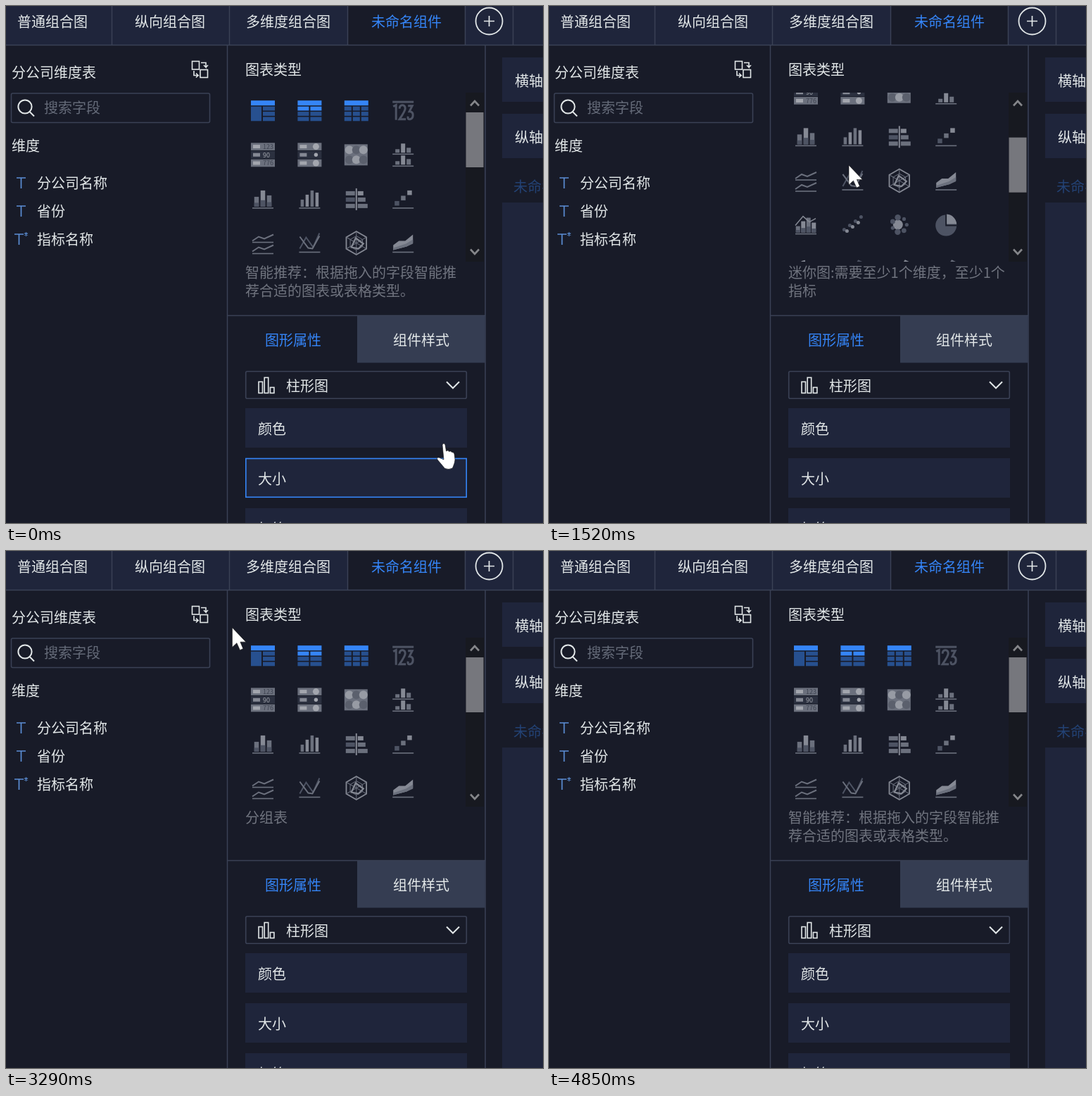
Write an HTML page that moves like this. It is 763 by 734 pixels and loops after 5.35 s.

```html
<!DOCTYPE html>
<html lang="zh-CN">
<head>
<meta charset="utf-8">
<style>
html, body { margin: 0; width: 100%; height: 100%; overflow: hidden; background: #181b28; }
svg { display: block; }
text { font: 300 20px "Noto Sans CJK SC", "Noto Sans CJK", sans-serif; white-space: pre; }
</style>
</head>
<body>
<svg id="stage" width="763" height="734" viewBox="0 0 763 734"></svg>
<script>
const BLUE = '#3585f7', NAVY = '#27508f', PANEL = '#1f253b', LINE = '#3a4155', BG = '#181b28';
const WHITE = '#e2e7e8', DARK = '#4d5363', GREY = '#6b707d', LIGHT = '#858994', PALE = '#a3a6ae';

const rect = (x, y, w, h, fill = GREY, extra = '') =>
  `<rect x="${x}" y="${y}" width="${w}" height="${h}" fill="${fill}" ${extra}/>`;
const stroke = (d, color = GREY, width = 2) =>
  `<path d="${d}" fill="none" stroke="${color}" stroke-width="${width}"/>`;
const frame = (x, y, w, h, color = LINE, extra = '') =>
  rect(x, y, w, h, 'none', `stroke="${color}" stroke-width="1.6" ${extra}`);
const shape = (d, fill = GREY) => `<path d="${d}" fill="${fill}"/>`;
const dot = (x, y, r, fill = GREY) => `<circle cx="${x}" cy="${y}" r="${r}" fill="${fill}"/>`;
const ring = (x, y, r, width) =>
  `<circle cx="${x}" cy="${y}" r="${r}" fill="none" stroke="${WHITE}" stroke-width="${width}"/>`;
const label = (x, middle, string, fill = WHITE) =>
  `<text x="${x}" y="${middle + 7.6}" fill="${fill}">${string}</text>`;
const repeat = (count, draw) => Array.from({ length: count }, (_, i) => draw(i)).join('');

// Chart icons, each drawn around its own centre
const base = (y = 13) => rect(-15, y - 0.8, 30, 1.6);
const tableHead = rect(-17, -14.5, 34, 7, BLUE);
const tableRow = (row, columns, color) => {
  const pitch = 36 / columns;
  return repeat(columns, i => rect(-17 + i * pitch, -6 + row * 7.4, pitch - 2, 5.8, color));
};
const cards = mark => repeat(3, i => {
  const y = -17 + i * 11.7, middle = i === 1;
  return rect(-17, y, 34, 10.6, middle ? '#2b303f' : GREY) +
    rect(-14, y + 2.8, 10, 5, middle ? LIGHT : PALE) + mark(y + 5.3, i);
});
const tinyNumber = (y, i) => `<text y="${y + 3.3}" style="font-size:9px" fill="${
  i === 1 ? PALE : '#3e4351'}">${['123', '90', '776'][i]}</text>`;

const columns = (heights, bottom, width, pitch) => heights.map((h, i) =>
  rect((i - (heights.length - 1) / 2) * pitch - width / 2, bottom - h, width, h, i % 2 ? LIGHT : GREY)).join('');
const stacked = (heights, bottom, width, pitch) =>
  columns(heights, bottom, width, pitch) + columns(heights.map(h => h / 2.5), bottom, width, pitch)
    .replaceAll(LIGHT, DARK).replaceAll(GREY, DARK);
const polygon = (sides, r) => 'M' + Array.from({ length: sides }, (_, i) => {
  const a = i * 2 * Math.PI / sides;
  return `${(r * Math.sin(a)).toFixed(1)} ${(-r * Math.cos(a)).toFixed(1)}`;
}).join('L') + 'Z';
const wave = y => stroke(`M-15 ${y}l9-6l8 3l13-6`);
const quarter = (turn, r, color) =>
  `<g transform="rotate(${turn})">${shape(`M1-1H${r}A${r} ${r} 0 0 0 1-${r}Z`, color)}</g>`;
const land = color => shape('M-16-2L-8-9L2-4L8-13L16-9L9 0L10 9L1 13L-6 8L-12 4Z', color);

const icons = [
  tableHead + rect(-17, -6, 15, 20.6, NAVY) + repeat(3, i => rect(0, -6 + i * 7.4, 17, 5.8, NAVY)),
  tableHead + tableRow(0, 2, BLUE) + tableRow(1, 2, NAVY) + tableRow(2, 2, NAVY),
  tableHead + repeat(3, i => tableRow(i, 3, NAVY)),
  rect(-15, -14, 30, 3, DARK) + stroke('M-14-6L-10-8V13M-5-3Q-5-8-1-8T3-3Q3 0-5 12H4M7-7H13L9 1Q14 1 14 6T10 12T7 8', DARK, 3),
  cards(tinyNumber),
  cards((y, i) => dot(9, y, i === 1 ? 2.7 : 4.5, PALE)),
  rect(-17, -15, 33, 30) + repeat(6, i => dot(-10 + i % 3 * 10, i < 3 ? -7 : 7, 6, i % 2 ? '#5b606d' : '#979ba4')),
  columns([5, 13, 7], -3, 6, 8) + base(-1) + columns([5, 13, 8], 14, 6, 8) + base(16),
  stacked([14, 23, 16], 11, 6.5, 9) + base(),
  columns([10, 17, 23, 20], 11, 4.5, 7) + base(),
  rect(-1, -15, 2, 31, LIGHT) + repeat(3, i =>
    rect(-15, -11 + i * 9, 13, 6, i === 1 ? DARK : GREY) + rect(2, -11 + i * 9, 8 + i * 3, 6, i ? GREY : LIGHT)),
  repeat(3, i => rect(-12 + i * 9, 3 - i * 7.5, 6.5, 6.5, [DARK, GREY, LIGHT][i])) + base(),
  wave(-3) + wave(12) + base(-1) + base(15),
  stroke('M-14 8L-5-8L5 6L14-14', DARK) + stroke('M-14-9L-2 7L4 8L14-10') + base(),
  stroke(polygon(6, 16.5), LIGHT, 1.8) + stroke(polygon(6, 10), GREY, 1) +
    repeat(3, i => `<path d="M0-16V16" stroke="${GREY}" transform="rotate(${i * 60})"/>`) +
    stroke('M-1-7L10 1L3 8L-7 6Z', LIGHT, 2.2),
  shape('M-14 3L-6-3L3-3L14-12V0L5 5L-14 10Z', LIGHT) + shape('M-14 7L4 1L14-5V1L5 5L-14 10Z') + base(),
  stacked([9, 16, 21, 14], 11, 6, 7.5) + stroke('M-15 1L-4-12L5-4L14-9', LIGHT, 1.5) + base(),
  repeat(7, i => dot(-12 + i * 4, 9 - i * 3 + i % 2 * 5 - 2, 2.5, i % 2 ? LIGHT : DARK)),
  dot(-2, 0, 7, LIGHT) + repeat(7, i => dot(10.5 * Math.cos(i * 0.9), 10.5 * Math.sin(i * 0.9), 2.6 + i % 3 * 0.8, DARK)),
  dot(0, 1, 15, DARK) + stroke('M0-14V1H15', BG, 2) + quarter(0, 15, LIGHT),
  repeat(4, i => quarter(i * 90, 10 + i % 2 * 2.5, i % 2 ? LIGHT : GREY)),
  land(DARK),
  land(LIGHT) + stroke('M-8-8L-4 2L9 4M-10 3L0 5L4 12', GREY, 1.2),
  land(GREY) + stroke('M8 9L-12-1L12-8L-3 7', LIGHT, 1.5)
];
const iconGrid = icons.map((icon, i) =>
  `<g transform="translate(${365 + i % 4 * 66.4} ${148.7 + Math.floor(i / 4) * 62.6})">${icon}</g>`).join('');

const fields = ['分公司名称', '省份', '指标名称'].map((name, i) =>
  stroke(`M${i < 2 ? 15 : 12} ${244 + i * 40}h13m-6.5 0v15`, '#5c8fd6', 1.7) + label(44, 251 + i * 40, name)).join('');
const rowTop = i => 571 + i * 71;
const rows = ['颜色', '大小', '标签'].map((name, i) =>
  rect(340, rowTop(i), 315, 56, PANEL) + label(358, rowTop(i) + 29, name)).join('');
const axes = ['横轴', '纵轴'].map((name, i) =>
  rect(705, 73 + i * 80, 58, 63, PANEL) + label(723, 106 + i * 80, name)).join('');

document.getElementById('stage').innerHTML =
  '<clipPath id="list"><path d="M315 123H653V363H315Z"/></clipPath>' +
  rect(0, 0, 763, 734, BG) + rect(0, 0, 763, 55, PANEL) + rect(485, 0, 167, 55, BG) +
  stroke('M0 55.5H763M150.5 0V55M317.5 0V55M485.5 0V55M652.5 0V55M720.5 0V55M314.5 55V734M681 55V734M315 439.5H681', LINE, 1.5) +
  label(16, 22, '普通组合图') + label(183, 22, '纵向组合图') + label(341, 22, '多维度组合图') +
  label(519, 22, '未命名组件', BLUE) +
  ring(686.5, 21.5, 19, 1.8) + stroke('M679 21.5h15M686.5 14v15', WHITE, 1.7) +

  label(8, 94, '分公司维度表') +
  frame(264.5, 78.5, 10, 11.5, WHITE) + frame(276, 90.5, 10.5, 11, WHITE) +
  stroke('M277 80.5H284V87l-3-3m3 3l3-3M267 92V98.5H273l-3-3m3 3l-3 3', WHITE, 1.6) +
  frame(7.5, 124, 282, 41.5, LINE, 'rx="2"') + ring(27, 143, 9.6, 2) + stroke('M33.5 150L40 156.5', WHITE) +
  label(54, 144, '搜索字段', '#656b79') + label(8, 198, '维度') + fields +
  stroke('M28.5 321v6m-2.5-4.5l5 3m0-3l-5 3', '#5c8fd6', 1.1) +

  label(340, 90, '图表类型') +
  `<g clip-path="url(#list)"><g id="icons">${iconGrid}</g></g>` +
  rect(653, 123, 26, 240, '#171920') + rect(653.5, 151, 25, 78, '#76777d', 'id="thumb"') +
  stroke('M660 141.5l6-6.5l6 6.5M660 345.5l6 6.5l6-6.5', '#85868a', 2.6) +
  '<g id="hint">' + label(340, 378, '', '#70747f') + label(340, 404, '', '#70747f') + '</g>' +
  rect(499, 440, 181.5, 66.5, '#353d52') + label(368, 474, '图形属性', BLUE) + label(550, 474, '组件样式') +
  frame(340.7, 518.7, 313.6, 38.6, LINE, 'rx="2"') +
  [16, 22, 8].map((h, i) => frame(359 + i * 8.2, 549.5 - h, 5.5, h, WHITE)).join('') +
  label(398, 539, '柱形图') + stroke('M626 533.5l9 9l9-9', WHITE) +
  rows + frame(340.8, 0, 313.4, 54.8, BLUE, 'id="focus"') +

  axes + label(721, 256, '未命名组件', '#234274') + rect(705, 279, 58, 455, PANEL) +
  '<g id="cursor" fill="#fff" stroke="#111" stroke-width=".6"><path id="arrow" d="M0 0V28L6.5 22L11 32L15.5 30L11.5 20.5H19.5Z"/>' +
  '<path id="hand" d="M0 2Q2-2 4 2L5.5 11Q8 9 9.5 11.5Q12 10 13.5 12.5Q16.5 12 17 15L18 23Q18 27 14.5 35Q9 38 3.5 35.5L-7 23Q-8.5 20-5 20L2 23Z"/></g>';

const [icoGroup, thumb, hint, focus, cursor, arrow, hand] =
  ['icons', 'thumb', 'hint', 'focus', 'cursor', 'arrow', 'hand'].map(id => document.getElementById(id));

const hints = {
  smart: ['智能推荐：根据拖入的字段智能推', '荐合适的图表或表格类型。'],
  mini: ['迷你图:需要至少1个维度，至少1个', '指标'],
  lines: ['多系列折线图:需要至少1个维度，至', '少2个指标'],
  group: ['分组表', ''],
  kpi: ['kpi指标卡:需要0个维度，1个指标', '']
};
const hintTimes = [[0, 'smart'], [830, 'mini'], [1900, 'lines'], [2830, 'mini'],
  [3220, 'group'], [3520, 'mini'], [3680, 'kpi'], [4150, 'mini'], [4460, 'smart']];

const clamp = v => Math.min(1, Math.max(0, v));
const easeOut = (t, start, length) => 1 - (1 - clamp((t - start) / length)) ** 3;

// One sweep around the icon list, anticlockwise from the upper left
const LOOP_START = 3290, LOOP_END = 4080;
function loop(t) {
  const angle = (55 + (t - LOOP_START) * 0.449) * Math.PI / 180;
  return [440 - 144 * Math.sin(angle), 145.5 - 65 * Math.cos(angle)];
}

// Pointer stops: time, x, y; straight moves between them
const stops = [
  [70, 620, 621], [340, 540, 10], [510, 469, 218], [830, 464, 219], [900, 430, 219],
  [1440, 426, 226], [3150, 426, 226], [LOOP_START, ...loop(LOOP_START)],
  [LOOP_END, ...loop(LOOP_END)], [4230, 405, 242], [4780, 488, 718], [4850, 490, 770]
];
function pointer(t) {
  if (t >= LOOP_START && t < LOOP_END) return loop(t);
  const next = stops.findIndex(stop => stop[0] > t);
  const b = stops.at(next), a = stops[Math.max(0, next - 1)] ?? b;
  if (next <= 0) return b.slice(1);
  const p = (t - a[0]) / (b[0] - a[0]);
  return [a[1] + (b[1] - a[1]) * p, a[2] + (b[2] - a[2]) * p];
}

function render() {
  const t = performance.now() % 5350;
  const scroll = 134 * (easeOut(t, 1400, 400) - easeOut(t, 2400, 350));
  icoGroup.setAttribute('transform', `translate(0 ${-scroll})`);
  thumb.setAttribute('y', 151 + scroll * 0.403);

  const lines = hints[hintTimes.findLast(([start]) => start <= t)[1]];
  lines.forEach((line, i) => { hint.children[i].textContent = line; });

  const [x, y] = pointer(t);
  const row = Math.floor((y + 22 - rowTop(0)) / 71);
  const hovered = row >= 0 && y < 734 && y + 22 < rowTop(row) + 56;
  focus.style.display = hovered ? '' : 'none';
  focus.setAttribute('y', rowTop(Math.max(0, row)) + 0.5);
  cursor.setAttribute('transform', `translate(${x} ${y})`);
  hand.style.display = y > 510 ? '' : 'none';
  arrow.style.display = y > 510 ? 'none' : '';
  requestAnimationFrame(render);
}
render();
</script>
</body>
</html>
```
